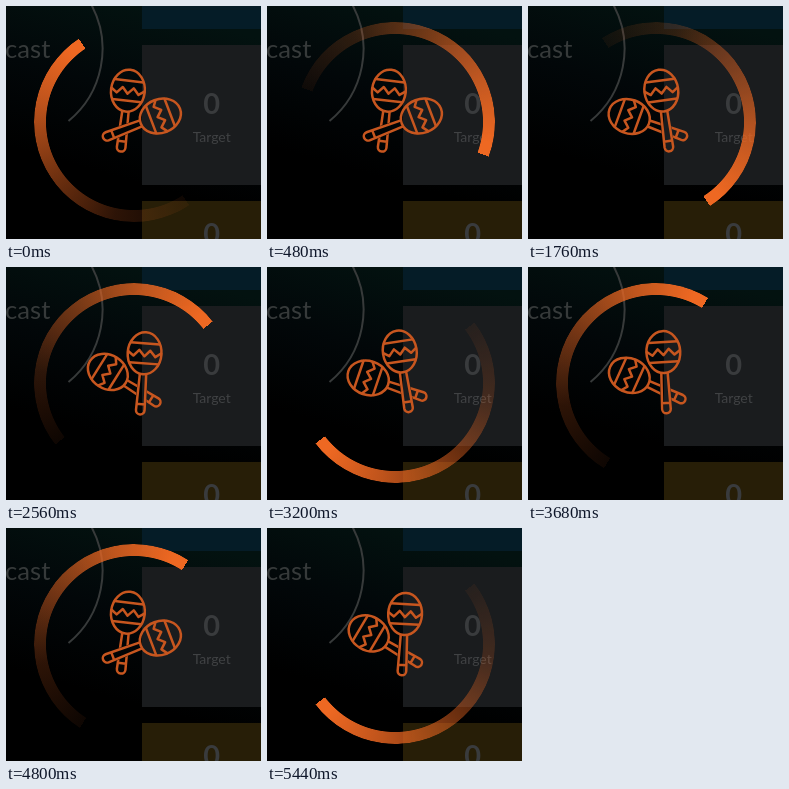
Animation of 255x233 px, one loop 5.6 s. Source, as an HTML page:

```html
<!DOCTYPE html>
<html lang="en">
<head>
<meta charset="utf-8">
<title>Maracas loader</title>
<style>
  html, body { margin: 0; width: 100%; height: 100%; overflow: hidden; background: #000; }
  .stage { position: relative; width: 255px; height: 233px; overflow: hidden; contain: strict; }
  svg { position: absolute; left: 0; top: 0; width: 255px; height: 233px; overflow: hidden; }
  text { font-family: Lato, "Open Sans", sans-serif; }
  .num { font-size: 29px; font-weight: 700; fill: #393b3d; text-anchor: middle; }
  .ring {
    position: absolute; left: 28px; top: 16px; width: 200px; height: 200px; border-radius: 50%;
    background: conic-gradient(from 180deg, rgba(238,104,34,.06), rgba(238,104,34,.19) 45deg,
      rgba(238,104,34,.48) 90deg, rgba(238,104,34,.8) 135deg, #ee6822 172deg 180deg, transparent 180deg);
    -webkit-mask: radial-gradient(circle closest-side, transparent 87.6%, #000 88.4%);
    mask: radial-gradient(circle closest-side, transparent 87.6%, #000 88.4%);
  }
  .line { fill: none; stroke: #c7561f; stroke-width: 2.5; stroke-linecap: round; stroke-linejoin: round; }
</style>
</head>
<body>
<div class="stage">
  <svg viewBox="0 0 255 233">
    <defs>
      <linearGradient id="night" gradientUnits="userSpaceOnUse" x1="136" y1="0" x2="90" y2="165">
        <stop offset="0" stop-color="#031210"/>
        <stop offset=".5" stop-color="#020709"/>
        <stop offset="1" stop-color="#000"/>
      </linearGradient>
    </defs>
    <rect width="255" height="233" fill="url(#night)"/>
    <path d="M85.5 -1 A93.2 93.2 0 0 1 62.5 115" fill="none" stroke="#373a3a" stroke-width="2"/>
    <text x="44.3" y="52" font-size="25.6" fill="#363a3a" text-anchor="end">cast</text>
    <rect x="136" width="119" height="23" fill="#051c27"/>
    <rect x="136" y="39" width="119" height="140" fill="#1a1c1e"/>
    <rect x="136" y="195" width="119" height="38" fill="#271e07"/>
    <text class="num" x="205.7" y="107.7">0</text>
    <text x="205.7" y="136" font-size="14" fill="#404244" text-anchor="middle">Target</text>
    <text class="num" x="205.7" y="237.7">0</text>
  </svg>

  <div class="ring" id="ring"></div>

  <svg viewBox="0 0 255 233">
    <defs>
      <path id="handle" d="M-3.2 21.4 L-4.3 57 a4.3 4.3 0 0 0 8.6 0 L3.2 21.4 M-4.1 51 H4.1"/>
      <g id="maraca">
        <ellipse rx="16.9" ry="21"/>
        <path d="M-14.5 -10 H14.5 M-16.5 -1 L-11 3 -5.5 -3 0 3 5.5 -3 11 3 16.5 -1 M-14.5 10 H14.5"/>
        <use href="#handle"/>
      </g>
      <mask id="behind" maskUnits="userSpaceOnUse" x="-60" y="-60" width="120" height="120">
        <rect x="-60" y="-60" width="120" height="120" fill="#fff"/>
        <use href="#handle" transform="translate(20.6 -16.8) rotate(31.2)" fill="#000" stroke="#000" stroke-width="3"/>
      </mask>
    </defs>
    <g class="line" id="pair">
      <g mask="url(#behind)"><use href="#maraca" transform="translate(-20.6 -16.8) rotate(-31.2)"/></g>
      <use href="#maraca" transform="translate(20.6 -16.8) rotate(31.2)"/>
    </g>
  </svg>
</div>

<script>
  const STEP = 160, STEPS = 35;
  // [step, ring angle]: a steady spin with a slightly uneven clock
  const spin = [[0, 326.5], [7, 662], [11, 867.3], [16, 1132], [20, 1312.8], [27, 1683], [34, 2032.8], [35, 2126.5]];
  const ROCKS_PER_TURN = 2.4, LIMIT = 39, LEAN = -1;
  const ring = document.getElementById('ring');
  const pair = document.getElementById('pair');

  function ringAngle(step) {
    const i = spin.findIndex(key => key[0] > step);
    const [s0, a0] = spin[i - 1], [s1, a1] = spin[i];
    return a0 + (a1 - a0) * (step - s0) / (s1 - s0);
  }

  function rockAngle(angle) {
    const turns = (angle - spin[0][1]) / 360;
    const swing = 44 * Math.cos(2 * Math.PI * (turns * ROCKS_PER_TURN - .02));
    return LEAN + Math.max(-LIMIT, Math.min(LIMIT, swing));
  }

  function draw(time) {
    const angle = ringAngle(Math.floor(time / STEP) % STEPS);
    ring.style.transform = `rotate(${angle}deg)`;
    pair.setAttribute('transform', `translate(127.8 110.6) rotate(${rockAngle(angle)})`);
  }

  const start = performance.now();
  function tick() {
    draw(performance.now() - start);
    requestAnimationFrame(tick);
  }
  tick();
</script>
</body>
</html>
```
